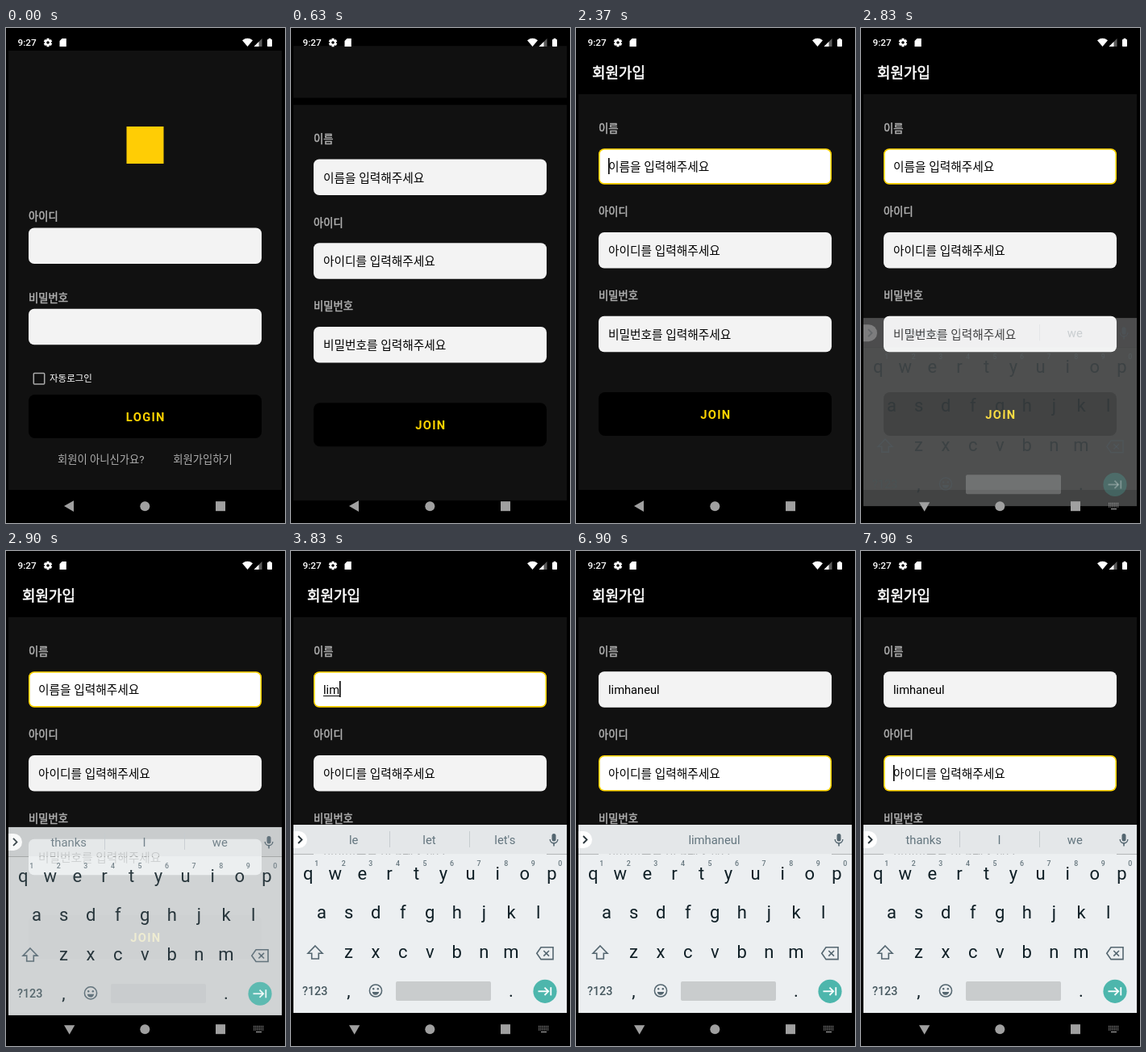
These frames come from a looping animation (346x613 px, 8000 ms). An HTML page with a canvas:

```html
<!DOCTYPE html>
<html lang="ko">
<head>
<meta charset="utf-8">
<title>Sign-up flow</title>
<style>
html, body { margin: 0; width: 100%; height: 100%; overflow: hidden; background: #000; }
canvas { display: block; width: 346px; height: 613px; }
</style>
</head>
<body>
<canvas id="stage"></canvas>
<script>
const W = 346, H = 613, LOOP = 8000, STEP = 200 / 3;
const FONT = "Roboto, 'Noto Sans CJK KR', 'Noto Sans CJK', sans-serif";
const YELLOW = '#ffd400', PANEL = '#111', LABEL = '#b0b0b0';
const INK = '#0f1f26', SLATE = '#546670', NAV = '#a0a0a0';
const NAME = 'limhaneul';
const DEFAULT_WORDS = ['thanks', 'I', 'we'];

// [time, typed letters, suggestions]; a single suggestion fills the strip
const TYPING = [
  [0, 0, DEFAULT_WORDS],
  [3630, 1, DEFAULT_WORDS],
  [3700, 1, ['l', 'I', 'look']],
  [3770, 2, ['l', 'I', 'look']],
  [3830, 3, ['le', 'let', "let's"]],
  [3900, 3, ['li', 'lit', 'little']],
  [4030, 3, ['lim', 'limit', 'limited']],
  [4100, 3, ['lim', 'limit', '']],
  [4170, 3, ['', 'lim', '']],
  [4370, 5, [NAME.slice(0, 5)]],
  [4430, 7, [NAME.slice(0, 7)]],
  [4570, 8, [NAME.slice(0, 8)]],
  [4700, 9, [NAME]],
  [6970, 9, []],
  [7100, 9, DEFAULT_WORDS]
];

const canvas = document.getElementById('stage');
const c = canvas.getContext('2d');
const dpr = window.devicePixelRatio || 1;
canvas.width = Math.round(W * dpr);
canvas.height = Math.round(H * dpr);

const clamp = v => Math.max(0, Math.min(1, v));
const between = (t, a, b) => t >= a && t < b;

// Solves a cubic curve segment through four points for y at x
function curve(x, [x0, y0, x1, y1, x2, y2, x3, y3]) {
  const at = (s, a, b, d, e) => {
    const r = 1 - s;
    return r * r * r * a + 3 * r * r * s * b + 3 * r * s * s * d + s * s * s * e;
  };
  let lo = 0, hi = 1;
  for (let i = 0; i < 30; i++) {
    const mid = (lo + hi) / 2;
    if (at(mid, x0, x1, x2, x3) < x) lo = mid; else hi = mid;
  }
  return at(lo, y0, y1, y2, y3);
}
const slowIn = p => curve(p, [0, 0, 0.4, 0, 0.2, 1, 1, 1]);
const extraSlowIn = p => p < 1 / 6
  ? curve(p, [0, 0, 0.05, 0, 0.1333, 0.06, 0.1667, 0.4])
  : curve(p, [0.1667, 0.4, 0.2083, 0.82, 0.25, 1, 1, 1]);

function text(str, x, y, size, color, { weight = 400, align = 'left', space = 0, embolden = 0 } = {}) {
  c.font = `${weight} ${size}px ${FONT}`;
  c.textAlign = align;
  c.letterSpacing = space + 'px';
  c.fillStyle = color;
  c.fillText(str, x, y);
  if (embolden) {
    c.strokeStyle = color;
    c.lineWidth = embolden;
    c.lineJoin = 'round';
    c.strokeText(str, x, y);
  }
  c.letterSpacing = '0px';
}

function rect(x, y, w, h, color) {
  c.fillStyle = color;
  c.fillRect(x, y, w, h);
}

function round(x, y, w, h, r, color) {
  c.beginPath();
  c.roundRect(x, y, w, h, r);
  c.fillStyle = color;
  c.fill();
}

function disc(x, y, r, color) {
  c.beginPath();
  c.arc(x, y, r, 0, Math.PI * 2);
  c.fillStyle = color;
  c.fill();
}

function trace(pts, close) {
  c.beginPath();
  pts.forEach(([x, y]) => c.lineTo(x, y));
  if (close) c.closePath();
}

function poly(pts, color) {
  trace(pts, true);
  c.fillStyle = color;
  c.fill();
}

function line(pts, color, width, close = false) {
  trace(pts, close);
  c.strokeStyle = color;
  c.lineWidth = width;
  c.lineJoin = 'miter';
  c.stroke();
}

function field(y, focused) {
  round(28, y, 289, 44.5, 7, focused ? YELLOW : '#f3f3f3');
  if (focused) round(29.6, y + 1.6, 285.8, 41.3, 5.6, '#fff');
}

const label = (str, y) => text(str, 28, y, 13.3, LABEL, { embolden: 0.5 });

function button(str, y) {
  round(28, y, 289, 54, 8, '#000');
  text(str, 173.3, y + 32.5, 14.7, YELLOW, { weight: 700, align: 'center', space: 1.31 });
}

function loginScreen() {
  rect(0, 0, W, H, '#000');
  rect(3, 28, 339, 544, PANEL);
  rect(149.5, 122, 46, 46, '#ffcd05');
  label('아이디', 238);
  field(247.5, false);
  label('비밀번호', 338.5);
  field(347.7, false);
  c.strokeStyle = '#aaa';
  c.lineWidth = 1.5;
  c.beginPath();
  c.roundRect(34.3, 427.6, 13.4, 13.4, 1);
  c.stroke();
  text('자동로그인', 54, 438.3, 11.5, '#fff');
  button('LOGIN', 454);
  text('회원이 아니신가요?', 64, 539, 13.3, LABEL);
  text('회원가입하기', 207.3, 539, 13.3, LABEL);
}

function joinScreen(t) {
  const [, count] = stateAt(t);
  const inName = between(t, 2370, 6900), inId = t >= 6900;
  rect(0, 0, W, H, '#000');
  rect(3, 82, 339, 490, PANEL);
  text('회원가입', 20, 61.6, 17.9, '#fff', { embolden: 0.6 });
  label('이름', 128.5);
  label('아이디', 232.3);
  label('비밀번호', 336);
  field(149.2, inName);
  field(253, inId);
  field(356.8, false);

  const typed = NAME.slice(0, count);
  text(typed || '이름을 입력해주세요', 40, 177.3, 14.7, '#000');
  const end = 40 + (typed ? c.measureText(typed).width : 0);
  if (typed && inName) rect(40, 179, end - 40, 1, '#000');
  text('아이디를 입력해주세요', 40, 281, 14.7, '#000');
  text('비밀번호를 입력해주세요', 40, 384.8, 14.7, '#000');

  if (between(t, 2370, 2830) || between(t, 3370, 5170)) rect(end, 161, 1.6, 20, '#000');
  if (between(t, 6970, 7500) || t >= 7900) rect(40, 265, 1.6, 20, '#000');
  button('JOIN', 451);
}

function stateAt(t) {
  return TYPING.filter(s => t >= s[0]).pop();
}

function microphone() {
  round(323.5, 350, 5, 9.5, 2.5, SLATE);
  c.strokeStyle = SLATE;
  c.lineWidth = 1.4;
  c.beginPath();
  c.arc(326, 357, 4.8, 0, Math.PI);
  c.stroke();
  rect(325.2, 361.5, 1.6, 4, SLATE);
}

function smiley(x, y) {
  c.strokeStyle = SLATE;
  c.lineWidth = 1.5;
  c.beginPath();
  c.arc(x, y, 7.6, 0, Math.PI * 2);
  c.stroke();
  disc(x - 2.8, y - 2.2, 1.2, SLATE);
  disc(x + 2.8, y - 2.2, 1.2, SLATE);
  c.beginPath();
  c.arc(x, y + 1, 4.2, 0.1, Math.PI - 0.1);
  c.fill();
}

function keyRow(keys, x, y) {
  [...keys].forEach((k, i) => text(k, x + i * 33.57, y, 22, INK, { align: 'center' }));
}

function keyboard(words) {
  rect(3, 339, 339, 36.5, '#e4e7e9');
  rect(3, 375.5, 339, 196.5, '#eceff1');

  round(3, 347, 17, 21, [0, 10.5, 10.5, 0], '#fff');
  line([[9, 353], [13.5, 357.5], [9, 362]], '#263238', 1.8);
  words.forEach((w, i) => {
    const x = words.length === 1 ? 171.5 : 77.7 + i * 93.8;
    text(w, x, 363, 14.8, '#63757e', { align: 'center' });
  });
  if (words.length === 3) [122, 221].forEach(x => rect(x, 347, 1, 20, '#c6cccf'));
  microphone();

  keyRow('qwertyuiop', 21.2, 407);
  [...'1234567890'].forEach((d, i) =>
    text(d, 31.7 + i * 33.57, 390.3, 8.8, '#66767e', { align: 'center', weight: 500 }));
  keyRow('asdfghjkl', 38, 455.3);
  keyRow('zxcvbnm', 71.5, 504);

  line([[30, 489], [39, 498.2], [34.3, 498.2], [34.3, 505], [25.7, 505], [25.7, 498.2], [21, 498.2]],
    SLATE, 1.6, true);
  line([[304.8, 498.2], [310, 490.8], [325, 490.8], [325, 505.6], [310, 505.6]], SLATE, 1.6, true);
  line([[313.3, 495], [320, 501.6]], SLATE, 1.6);
  line([[320, 495], [313.3, 501.6]], SLATE, 1.6);

  text('?123', 29.7, 550, 14.4, '#46585f', { align: 'center', weight: 500 });
  text(',', 71.5, 552, 22, INK, { align: 'center' });
  smiley(105, 544.5);
  round(130, 533, 118, 24, 2, '#c9cccd');
  text('.', 273, 552, 22, INK, { align: 'center' });
  disc(315, 545.3, 14.6, '#4db6ac');
  line([[306.5, 545.3], [319, 545.3]], '#fff', 1.8);
  line([[314.5, 540.6], [319.2, 545.3], [314.5, 550]], '#fff', 1.8);
  line([[322.3, 540.2], [322.3, 550.4]], '#fff', 1.8);
}

function gear(x, y) {
  c.save();
  c.translate(x, y);
  for (let i = 0; i < 6; i++) {
    c.rotate(Math.PI / 3);
    rect(-1.5, -5.2, 3, 3, '#fff');
  }
  c.restore();
  c.strokeStyle = '#fff';
  c.lineWidth = 2.2;
  c.beginPath();
  c.arc(x, y, 2.9, 0, Math.PI * 2);
  c.stroke();
}

function statusBar() {
  text('9:27', 14.5, 22, 11.8, '#fff', { weight: 500 });
  gear(52, 18);
  poly([[69.5, 13], [74.8, 13], [74.8, 23], [66.5, 23], [66.5, 16]], '#fff');
  c.fillStyle = '#fff';
  c.beginPath();
  c.moveTo(299.5, 23);
  c.lineTo(293, 15.3);
  c.quadraticCurveTo(299.5, 10.4, 306, 15.3);
  c.fill();
  poly([[317.5, 13], [317.5, 23], [307.5, 23]], '#5c5c5c');
  poly([[313.5, 17], [313.5, 23], [307.5, 23]], '#fff');
  round(324, 14, 6, 9, 0.8, '#fff');
  rect(325.6, 12.8, 2.8, 1.5, '#fff');
}

function navBar(typing) {
  if (typing) {
    poly([[72, 587.3], [85.3, 587.3], [78.7, 598.8]], NAV);
    for (let i = 0; i < 6; i++) {
      for (let j = 0; j < 3; j++) rect(307 + i * 2.2, 588 + j * 2.2, 1.2, 1.2, NAV);
    }
    rect(310, 595, 7, 1.2, NAV);
  } else {
    poly([[84, 585.2], [84, 599], [72, 592.1]], NAV);
  }
  disc(172.3, 592.2, 6, NAV);
  rect(260, 586.2, 12, 12, NAV);
}

function shifted(dy, alpha, draw) {
  c.save();
  c.translate(0, dy);
  c.globalAlpha = alpha;
  draw();
  c.restore();
}

function render(t) {
  const snapped = 500 + Math.floor((t - 495) / STEP) * STEP;
  c.setTransform(dpr, 0, 0, dpr, 0, 0);
  rect(0, 0, W, H, '#000');

  const p = t < 500 ? 0 : clamp((snapped - 489) / 425);
  const e = slowIn(p);
  if (p < 1) shifted(-0.02 * H * e, 1 - 0.1 * e, loginScreen);
  if (p > 0) {
    shifted(0.041 * H * (1 - e), 1, () => {
      const top = p < 1 ? 0.959 * H * (1 - extraSlowIn(p)) : 0;
      c.beginPath();
      c.rect(0, top, W, H - top);
      c.clip();
      joinScreen(t);
    });
  }

  if (t >= 2825) {
    const rest = 1 - clamp((snapped - 2816) / 226);
    const fade = 1 - clamp((snapped - 2816) / 168);
    shifted(30 * rest ** 5, 1 - fade ** 3, () => keyboard(stateAt(t)[2]));
  }
  statusBar();
  navBar(t >= 2630);
}

function tick(now) {
  render(now % LOOP);
  requestAnimationFrame(tick);
}
render(0);
requestAnimationFrame(tick);
</script>
</body>
</html>
```
